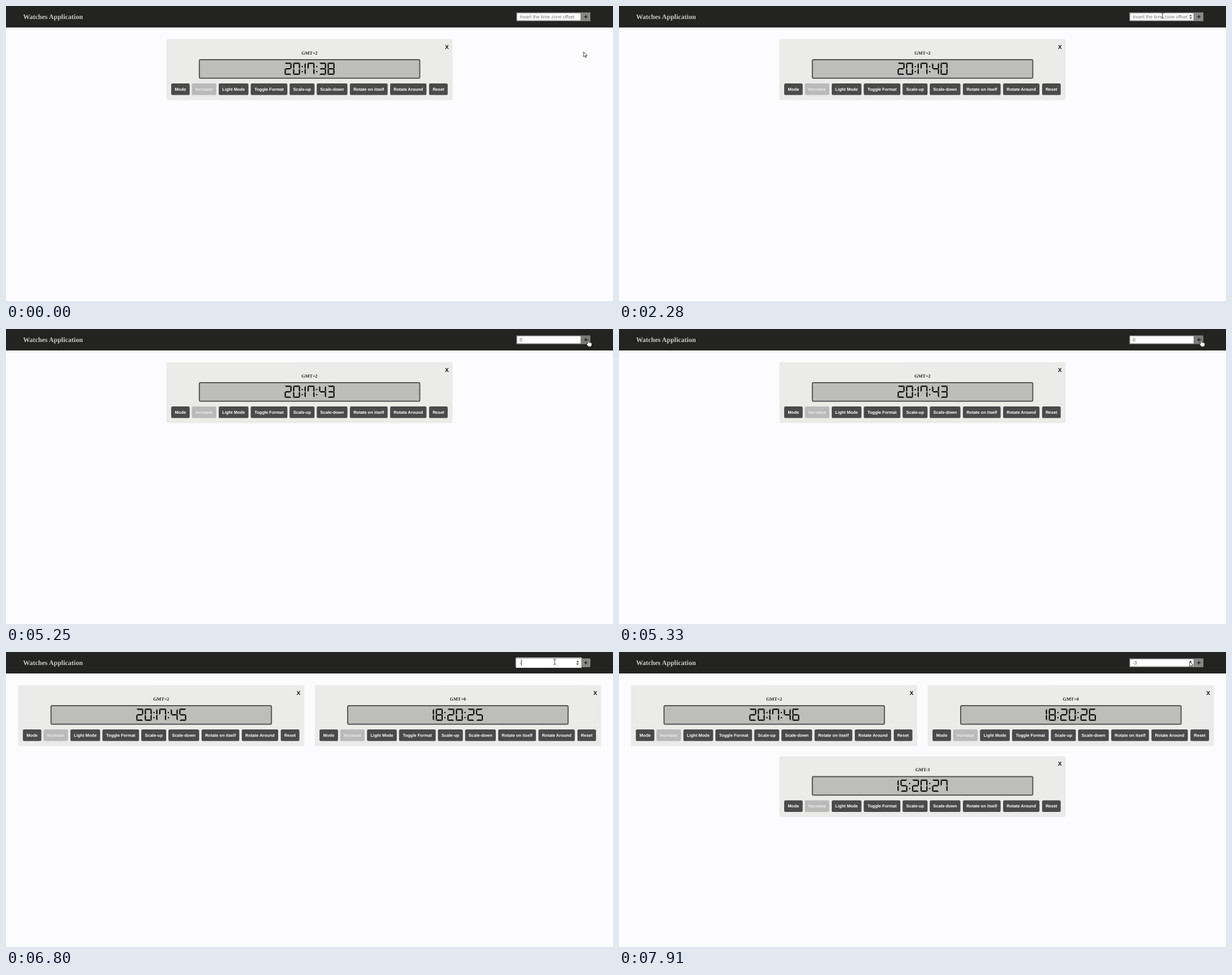
An HTML page for the animation above (8000 ms loop, 1073x522 px).

```html
<!DOCTYPE html>
<html lang="en">
<head>
<meta charset="utf-8">
<title>Watches Application</title>
<style>
  html, body { margin: 0; width: 100%; height: 100%; overflow: hidden; background: #fcfcfe; }
  svg { display: block; width: 1073px; height: 522px; text-rendering: geometricPrecision; }
  text { font-family: "Liberation Sans", Arial, sans-serif; }
  .serif { font: bold 8.2px "Liberation Serif", "Times New Roman", serif; fill: #222; }
  .title { font-size: 12px; fill: #c8c8c6; }
  .label { font-size: 7.5px; font-weight: bold; fill: #fff; }
  .close { font-size: 10px; font-weight: bold; fill: #111; }
  .field { font-size: 8.45px; fill: #757575; }
  .value { fill: #555; }
  .plus { font-size: 12px; font-weight: bold; fill: #1c1c1a; }
  .mid { text-anchor: middle; }
  .pointer { fill: #fff; stroke: #111; stroke-width: .8; stroke-linejoin: round; }
</style>
</head>
<body>
<svg viewBox="0 0 1073 522">
  <rect width="1073" height="522" fill="#fcfcfe"/>
  <rect width="1073" height="38" fill="#232322"/>
  <text class="serif title" x="30.2" y="22.7">Watches Application</text>

  <g id="ring">
    <rect x="900.8" y="9.8" width="117.4" height="18.2" rx="2" fill="#fff"/>
    <rect x="901.7" y="10.7" width="115.6" height="16.4" rx="1.2" fill="#101010"/>
  </g>
  <rect id="box" x="902.8" y="12" width="113.6" height="14.2" fill="#fff" stroke="#777" stroke-width="1.4"/>
  <text id="hint" class="field" x="908" y="22.4">Insert the time zone offset</text>
  <text id="value" class="field value" x="908" y="22.4"></text>
  <rect id="caret" x="907.8" y="13.4" width="1" height="10.6" fill="#222"/>
  <path id="spinner" fill="#4a4a4a" d="M1008 18.2h5l-2.5-2.9zM1008 20.2h5l-2.5 2.9z"/>
  <rect id="add" x="1017" y="11.4" width="16" height="15.4" fill="#888886"/>
  <text class="plus mid" x="1025" y="23.1">+</text>

  <g id="cards"></g>

  <g id="cursor">
    <path id="arrow" class="pointer" d="M0 0V8.9L2.1 7.1L3.5 10.2L5 9.5L3.6 6.6H6.3Z"/>
    <path id="beam" fill="none" stroke="#222" stroke-width=".9" d="M-2-4.4H-.6L0-3.9L.6-4.4H2M0-3.9V3.9M-2 4.4H-.6L0 3.9L.6 4.4H2"/>
    <path id="hand" class="pointer" d="M-1 .6Q0-.8 1 .6V4.4Q2.2 3.8 2.9 4.8Q4.1 4.3 4.7 5.3Q6.3 4.9 6.5 6.6V8.6Q6.3 10.5 5.5 12H.2Q-1.2 9.6-3.2 7.4Q-3.2 5.8-1 7Z"/>
    <path id="mark" fill="#666" d="M-2-4.6H2L.4-2.4H-.4Z"/>
  </g>
</svg>

<script>
const LOOP = 8000;
const $ = id => document.getElementById(id);
const show = (el, on) => el.style.display = on ? '' : 'none';

// Seven-segment shapes in a 12.3 x 21.5 cell.
const SEG = {
  a: 'M.5 0H11.8L9.8 2.2H2.5Z',
  b: 'M12.3.5V10L11.5 10.5L10.1 9.2V2.7Z',
  c: 'M12.3 21V11.5L11.5 11L10.1 12.3V18.8Z',
  d: 'M.5 21.5H11.8L9.8 19.3H2.5Z',
  e: 'M0 21V11.5L.8 11L2.2 12.3V18.8Z',
  f: 'M0 .5V10L.8 10.5L2.2 9.2V2.7Z',
  g: 'M1.2 10.75L2.5 9.6H9.8L11.1 10.75L9.8 11.9H2.5Z'
};
const DIGITS = ['abcdef', 'bc', 'abdeg', 'abcdg', 'bcfg', 'acdfg', 'acdefg', 'abcf', 'abcdefg', 'abcdfg'];
const COLON = '<path d="M1.7 5.6h2.1v2.3h-2.1zM1.7 14.6h2.1v2.3h-2.1z"/>';
const advance = ch => ch === ':' ? 5.5 : ch === '1' ? 5 : 15;

function glyph(ch, x) {
  const shape = ch === ':' ? COLON
    : `<path d="${[...DIGITS[ch]].map(s => SEG[s]).join('')}"/>`;
  const shift = ch === ':' ? 0 : ch === '1' ? -8.9 : 1.5;
  return `<g transform="translate(${x + shift} 100.3)">${shape}</g>`;
}

function drawTime(str) {
  let x = 536.5 - [...str].reduce((w, ch) => w + advance(ch), 0) / 2;
  return [...str].map(ch => {
    const out = glyph(ch, x);
    x += advance(ch);
    return out;
  }).join('');
}

const BUTTONS = [
  ['Mode', 292, 324.7], ['Increase', 328.5, 371.8], ['Light Mode', 376, 428.6],
  ['Toggle Format', 432.6, 497.4], ['Scale-up', 501.3, 545.4], ['Scale-down', 549.3, 603.6],
  ['Rotate on itself', 607.9, 674.6], ['Rotate Around', 679, 743.3], ['Reset', 747.9, 780.8]
];

function button([name, x1, x2]) {
  const off = name === 'Increase';
  return `<rect x="${x1}" y="137" width="${x2 - x1}" height="20.6" rx="2.6" fill="${off ? '#bababa' : '#4a4a4a'}"/>
    <text class="label mid" x="${(x1 + x2) / 2}" y="149.9"${off ? ' style="fill:#ededed"' : ''}>${name}</text>`;
}

function makeCard(zone) {
  const g = document.createElementNS('http://www.w3.org/2000/svg', 'g');
  g.innerHTML = `
    <rect x="283" y="58.3" width="507" height="108.8" rx="4" fill="#f4f4f3"/>
    <rect x="284" y="59.3" width="505" height="106.8" rx="3" fill="#ebebe9"/>
    <text class="close mid" x="779.3" y="75.6">X</text>
    <text class="serif mid" x="536.5" y="85.6">${zone}</text>
    <rect x="341.8" y="94.9" width="389.6" height="32.8" rx="2" fill="#bdbdbc" stroke="#555" stroke-width="2"/>
    <g class="time" fill="#060606"></g>` + BUTTONS.map(button).join('');
  $('cards').append(g);
  return g;
}

// start: moment of appearance; tick: first second change
const watches = [
  { zone: 'GMT+2', prefix: '20:17:', from: 38, start: 0, tick: 690 },
  { zone: 'GMT+0', prefix: '18:20:', from: 24, start: 5500, tick: 6500 },
  { zone: 'GMT-3', prefix: '15:20:', from: 27, start: 7730, tick: 8730 }
];
watches.forEach(w => {
  w.el = makeCard(w.zone);
  w.face = w.el.querySelector('.time');
});

const PATH = [
  [0, 1021, 81], [1200, 1021, 81], [1250, 1020.5, 80.5], [1510, 1020.5, 80.5], [2240, 961, 17],
  [4360, 961, 17], [4690, 1034, 20], [4860, 1034, 20], [5200, 1029, 19.2], [5510, 1029, 19.2],
  [5590, 1024, 18], [5680, 1024, 18], [5920, 1000, 17.5], [6000, 1000, 17.5], [6240, 970, 17.5],
  [6900, 970, 17.5], [7270, 1030, 18], [7310, 1030, 18], [7470, 1024.3, 17.6],
  [7760, 1024.3, 17.6], [7900, 1008.8, 16.8], [LOOP, 1008.8, 16.8]
];
const VALUES = [[0, ''], [4340, '0'], [6680, '-'], [6820, '-3']];
const FOCUS = [[2640, 4870], [6490, 7310]];

function cursorAt(t) {
  const i = PATH.findIndex(p => p[0] > t);
  const [t0, x0, y0] = PATH[i - 1], [t1, x1, y1] = PATH[i];
  const k = (t - t0) / (t1 - t0), e = k * k * (3 - 2 * k);
  return [x0 + (x1 - x0) * e, y0 + (y1 - y0) * e];
}

function drawCursor(t) {
  const [x, y] = cursorAt(t);
  const inRow = y > 11 && y < 27;
  const overField = inRow && x > 902 && x < 1017;
  const overAdd = inRow && x >= 1017 && x < 1036;
  const kind = t >= 5915 && t < 5985 ? 'mark'
    : overAdd ? 'hand' : overField && x < 1006 ? 'beam' : 'arrow';
  for (const id of ['arrow', 'beam', 'hand', 'mark']) show($(id), id === kind);
  $('cursor').setAttribute('transform', `translate(${x} ${y})`);
  show($('spinner'), overField);
  $('add').setAttribute('fill', overAdd ? '#7b7b79' : '#888886');
}

function drawField(t) {
  const value = VALUES.filter(v => v[0] <= t).pop()[1];
  const focus = FOCUS.find(([a, b]) => t >= a && t < b);
  $('value').textContent = value;
  show($('hint'), !value);
  show($('ring'), focus);
  $('box').setAttribute('stroke', focus ? '#fff' : '#777');
  show($('caret'), focus && (t - focus[0]) % 1020 < 510);
  $('caret').setAttribute('x', 907.8 + $('value').getComputedTextLength());
}

function drawWatches(t) {
  const count = watches.filter(w => t >= w.start).length;
  watches.forEach((w, i) => {
    show(w.el, i < count);
    const dx = count === 1 || i === 2 ? 0 : i ? 262.2 : -262.2;
    w.el.setAttribute('transform', `translate(${dx} ${i === 2 ? 125.5 : 0})`);
    const sec = w.from + Math.max(0, Math.floor((t - w.tick) / 1000) + 1);
    if (sec !== w.shown) {
      w.face.innerHTML = drawTime(w.prefix + sec);
      w.shown = sec;
    }
  });
}

const begin = performance.now();
function frame() {
  const t = (performance.now() - begin) % LOOP;
  drawWatches(t);
  drawField(t);
  drawCursor(t);
  requestAnimationFrame(frame);
}
frame();
</script>
</body>
</html>
```
